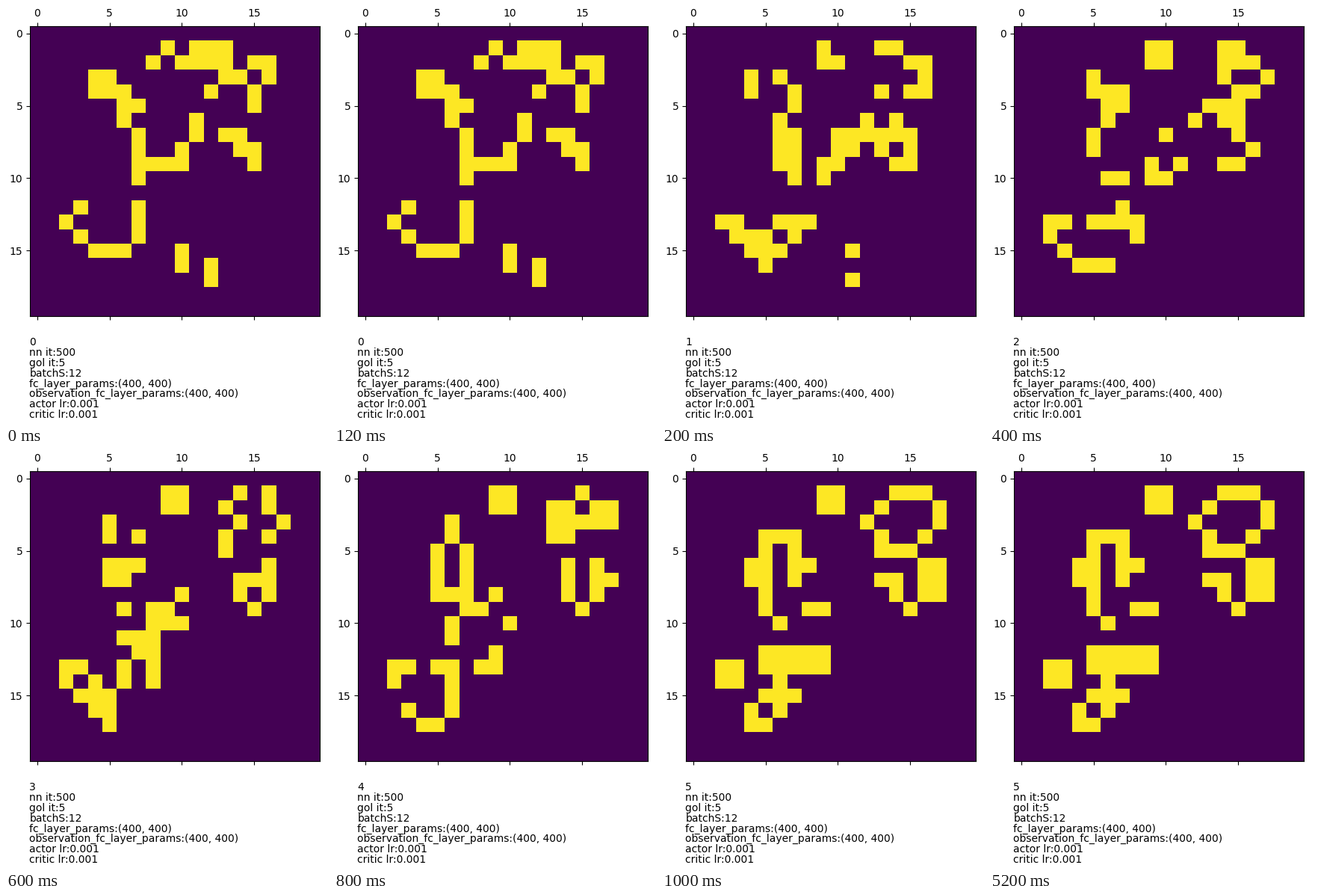
A matplotlib script that plays this animation: 431x558 px, repeating every 8 s.

```python
import matplotlib.pyplot as plt
import numpy as np
from matplotlib.animation import FuncAnimation

W, H, DPI = 431, 558, 100
SIZE = 20
STEP_MS, LOOP_MS = 200, 8000
LAST_GEN = 5

# Live columns of the starting board, by row
START = {
    1: [9, 11, 12, 13],
    2: [8, 10, 11, 12, 13, 15, 16],
    3: [4, 5, 13, 14, 16],
    4: [4, 5, 6, 12, 15],
    5: [6, 7, 15],
    6: [6, 11],
    7: [7, 11, 13, 14],
    8: [7, 10, 14, 15],
    9: [7, 8, 9, 10, 15],
    10: [7],
    12: [3, 7],
    13: [2, 7],
    14: [3, 7],
    15: [4, 5, 6, 10],
    16: [10, 12],
    17: [12],
}

NOTES = [
    "nn it:500",
    "gol it:5",
    "batchS:12",
    "fc_layer_params:(400, 400)",
    "observation_fc_layer_params:(400, 400)",
    "actor lr:0.001",
    "critic lr:0.001",
]


def first_board():
    board = np.zeros((SIZE, SIZE), dtype=int)
    for row, cols in START.items():
        board[row, cols] = 1
    return board


def life_step(board):
    """One Game of Life step; the outermost ring of cells stays dead."""
    near = sum(
        np.roll(board, (dy, dx), (0, 1))
        for dy in (-1, 0, 1)
        for dx in (-1, 0, 1)
        if (dy, dx) != (0, 0)
    )
    alive = (near == 3) | ((board == 1) & (near == 2))
    new = np.zeros_like(board)
    new[1:-1, 1:-1] = alive[1:-1, 1:-1]
    return new


boards = [first_board()]
for _ in range(LAST_GEN):
    boards.append(life_step(boards[-1]))

plt.rcParams["font.family"] = "DejaVu Sans"
# The small surplus keeps the pixel size from being rounded down
fig = plt.figure(figsize=((W + 0.01) / DPI, (H + 0.01) / DPI), dpi=DPI,
                 facecolor="white")

left, top, side = 32, 27, 387.6
ax = fig.add_axes([left / W, 1 - (top + side) / H, side / W, side / H])
image = ax.matshow(boards[0], cmap="viridis", vmin=0, vmax=1)
ax.set_xticks(range(0, SIZE, 5))
ax.set_yticks(range(0, SIZE, 5))


def note(line, text):
    y = 454 + 13.86 * line
    return fig.text(31.4 / W, 1 - y / H, text, fontsize=10, va="baseline")


counter = note(0, "0")
for i, text in enumerate(NOTES, 1):
    note(i, text)


def update(frame):
    gen = min(frame, LAST_GEN)
    image.set_data(boards[gen])
    counter.set_text(str(gen))
    return image, counter


anim = FuncAnimation(
    fig, update, frames=LOOP_MS // STEP_MS, interval=STEP_MS,
    repeat=True, repeat_delay=0, blit=False,
)
plt.show()
```
